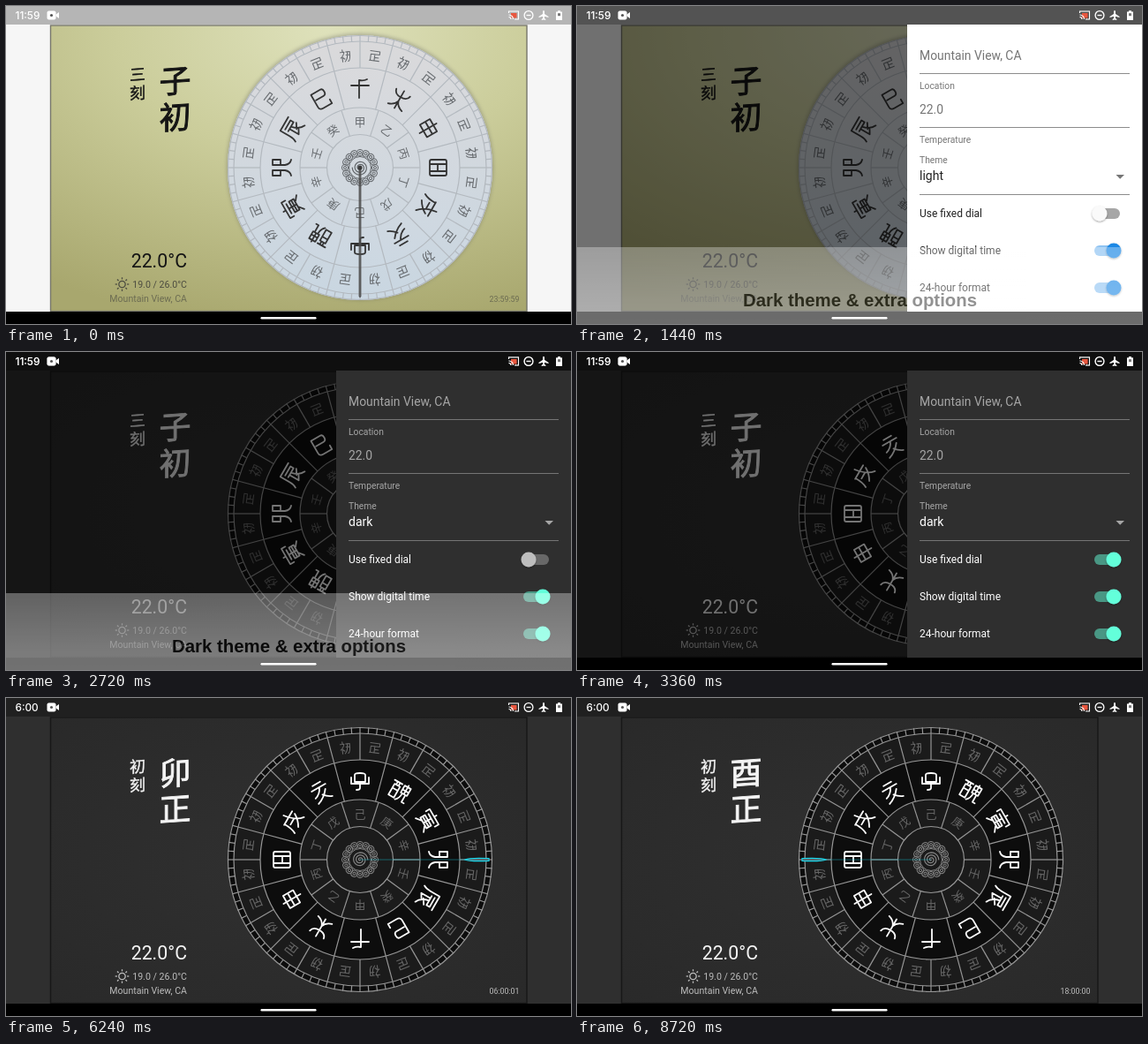
An HTML page that plays this animation: 640x360 px, repeating every 8.8 s.

```html
<!DOCTYPE html>
<html lang="en">
<head>
<meta charset="utf-8">
<title>Twelve-hour dial clock</title>
<style>
html, body { margin: 0; width: 100%; height: 100%; overflow: hidden; background: #000; }
svg { display: block; width: 640px; height: 360px; font-family: Roboto, sans-serif; }
svg {
  --bar: #b5b5b5; --page: #f6f6f6; --edge: #77776c; --ink: #151515; --soft: #4c4c40; --place: #6c6c52;
  --line: #b3b9bf; --glyph: #333; --faint: #686c70; --core: #62666a;
  --outer: #d0d7dc; --band: #d4dae0; --inner: #d3d9de; --sheet: #fff; --label: #757575;
  --strong: #222; --rule: #8c8c8c; --on: #1e88e5; --thumb: #fafafa; --track: #a6a6a6;
}
svg.dark {
  --bar: #202020; --page: #2f2f2f; --edge: #171717; --ink: #f4f4f4; --soft: #bdbdbd; --place: #bdbdbd;
  --line: #969696; --glyph: #fff; --faint: #666; --core: #858585;
  --outer: #1b1b1b; --band: #0d0d0d; --inner: #1b1b1b; --sheet: #2f2f2f; --label: #a6a6a6;
  --strong: #fff; --rule: #757575; --on: #64ffda; --thumb: #bdbdbd; --track: #686868;
}
.light-only, .dark-only { visibility: hidden; }
svg:not(.dark) .light-only, svg.dark .dark-only { visibility: visible; }
.han { font-family: "Noto Sans CJK SC", "Noto Sans CJK", "Noto Sans CJK JP", sans-serif; text-anchor: middle; }
.big, .small { fill: var(--ink); stroke: var(--ink); }
.big { font-size: 36px; font-weight: 500; stroke-width: .9px; }
.small { font-size: 18px; stroke-width: .4px; }
.end { text-anchor: end; }
.seal, .mark { fill: none; stroke-linejoin: round; stroke-linecap: round; }
.seal { stroke: var(--glyph); stroke-width: 1.8; }
.mark { stroke: var(--faint); stroke-width: 1.2; }
.stem { font-size: 13px; font-weight: 300; fill: var(--faint); }
.grid { fill: none; stroke: var(--line); stroke-width: 1.2; }
.bar { font: 500 11.8px Inter, sans-serif; fill: #fff; }
.label { fill: var(--label); }
.strong { fill: var(--strong); }
</style>
</head>
<body>
<script>
const LOOP = 8800, CX = 401, CY = 183;
const branches = {
  子: "M-6 1V-7Q-6-9 0-9Q6-9 6-7V1ZM-10-4V3H10V-4M0 1V8Q0 10-4 10",
  丑: "M-11-9H-1M-9-5H-2V9H-9ZM-9 0H-2M-7-9V-5M-4-9V-5M2-9H10V0H2ZM6-11V0M2-4H10M4 0Q4 7 0 10M8 0V9H11",
  寅: "M0-11V-8M-10-3V-8H10V-3M-6-4H6M-7 0H7V6H-7ZM0-4V6M-7 3H7M-4 7L-9 11M4 7L9 11",
  卯: "M-3-10V4Q-4 10-9 11M-3-10H-9V-1H-3M3-10V4Q4 10 9 11M3-10H9V-1H3",
  辰: "M-9-10H9M-9-10V2Q-9 8-11 11M-5-6H7V-2H-5M-2-2V10L3 7M8 1L2 5M1-2Q3 8 10 11",
  巳: "M-5-2H5Q8-2 8-6Q8-10 5-10H-7V6Q-7 10-2 10H9V5",
  午: "M-10-4H10M-1-10V10M-1-10Q4-9 8-11",
  未: "M0-11V11M-9-9Q-8-3 0-3Q8-3 9-9M0 2Q-2 8-9 10M0 2Q2 8 9 10",
  申: "M0-11V11M-8-7H8V6H-8ZM-8-1H8",
  酉: "M-7-9H7Q9-9 9-7V8Q9 10 7 10H-7Q-9 10-9 8V-7Q-9-9-7-9M-4-9V10M4-9V10M-4 1H4",
  戌: "M-9-5H9M-8-5Q-8 5-11 10M0-11Q2 4 10 10M8-1Q4 6-3 10M-5 1H2",
  亥: "M-5-10H5M-9-5H9M1-5Q-2 2-9 4M6 0Q0 8-9 11M0 4Q4 9 9 11"
};
const halves = [
  "M-6-6H6V-2H-5M0-2V6M0 2H5M-5-2V6M-6 6H6",
  "M-3-8V-5M-6-5H-1Q-3 1-6 2M-4 0V7M-3 2L-1 4M1-5H6Q6 6 3 7M3-5Q3 4-1 7M1-1H6"
];
const stems = [..."己庚辛壬癸甲乙丙丁戊"];

// start, fade length, cut?, characters, digital time, status time, hand angle
const scenes = [
  [0, 1, true, "子初三", "23:59:59", "11:59", 0],
  [4080, 620, false, "子正初", "00:00:00", "12:00", 0],
  [4720, 320, true, "卯初三", "05:59:59", "5:59", 90],
  [5360, 640, false, "卯正初", "06:00:00", "6:00", 90],
  [6160, 1, true, "卯正初", "06:00:01", "6:00", 90],
  [6320, 1, true, "午初三", "11:59:59", "11:59", 180],
  [6560, 640, false, "午正初", "12:00:00", "12:00", 180],
  [7440, 320, true, "酉初三", "17:59:59", "5:59", 270],
  [7840, 640, false, "酉正初", "18:00:00", "6:00", 270]
];

const times = (n, f) => Array.from({ length: n }, (_, i) => f(i)).join("");
const polar = (deg, r, body) => `<g transform="rotate(${deg}) translate(0 ${-r})">${body}</g>`;
const circle = (r, fill) => `<circle r="${r}" style="fill:${fill}"/>`;
const text = (x, y, size, cls, str) => `<text x="${x}" y="${y}" font-size="${size}" class="${cls}">${str}</text>`;
const spokes = (n, r1, r2, shift = 0) =>
  times(n, i => `<path d="M0 ${-r1}V${-r2}" transform="rotate(${i * 360 / n + shift})"/>`);
const pair = (slot, make) => times(2, i => `<g data-slot="${slot}${i}">${make}</g>`);

const spiral = "M0 0" + times(60, i => {
  const a = i * 0.32, r = i * 0.15;
  return `L${(r * Math.cos(a)).toFixed(1)} ${(r * Math.sin(a)).toFixed(1)}`;
});

const dial = `
  <circle r="151" cy="1" class="light-only" fill="#555" opacity=".35" filter="url(#blur)"/>
  ${circle(150, "var(--band)")}${circle(143, "var(--outer)")}
  ${circle(113, "var(--band)")}${circle(68, "var(--inner)")}
  <circle r="150" class="light-only" fill="url(#sheen)"/>
  <g class="grid">
    ${[149.5, 143, 113, 68, 37.5].map(r => `<circle r="${r}"/>`).join("")}
    ${spokes(96, 143, 150)}${spokes(24, 113, 143)}${spokes(12, 68, 113, 15)}${spokes(10, 37.5, 68, 18)}
  </g>
  ${Object.values(branches).map((d, i) => polar(i * 30, 89, `<path class="seal" d="${d}"/>`)).join("")}
  ${times(24, i => polar(i * 15 + 7.5, 127.5, `<path class="mark" d="${halves[i % 2]}" transform="scale(.9)"/>`))}
  ${stems.map((s, i) => polar(i * 36, 52, `<text class="han stem" y="5">${s}</text>`)).join("")}
  <g style="fill:none;stroke:var(--core)">
    ${times(16, i => polar(i * 22.5, 17, '<circle r="3.6"/><circle r="1.5"/>'))}
    <circle r="12.5"/><path d="${spiral}" stroke-width="1.2"/>
  </g>`;

const hand = `
  <g class="light-only"><path d="M0 0V-146" stroke="#555" stroke-width="4" opacity=".4"/>
    <path d="M0 0V-147" stroke="#4a4a4a" stroke-width="1.5"/><circle r="2.5" fill="#3a3a3a"/></g>
  <g class="dark-only"><path d="M0 0V-120" stroke="#16a9b8" opacity=".5"/>
    <path d="M0-119Q2.4-124 1.4-146H-1.4Q-2.4-124 0-119Z" fill="#59666a" stroke="#18d4e8" stroke-width="1.2"/></g>`;

const icons = `<g fill="#fff">
  <rect x="46.5" y="5.5" width="10" height="10" rx="2"/><path d="M56.5 9.5L60 7V14L56.5 11.5Z"/>
  <circle cx="51.5" cy="10.5" r="1.6" fill="#555"/>
  <rect x="572" y="8" width="6.5" height="5.5" fill="#e8573f"/>
  <path d="M569.5 8V6H580.5V15H576M569.5 10A5 5 0 0 1 574.5 15M569.5 12.5A2.5 2.5 0 0 1 572 15"
    fill="none" stroke="#fff" stroke-width="1.1"/>
  <g fill="none" stroke="#fff" stroke-width="1.3"><circle cx="592" cy="10.5" r="4.9"/><path d="M589.5 10.5H594.5"/></g>
  <path d="M609 5Q610 5 610 6.5V9L614.5 12V13L610 11.7V14L611.3 15V16L609 15.4L606.7 16V15L608 14V11.7L603.5 13V12L608 9V6.5Q608 5 609 5Z"/>
  <path d="M623 6.5H625V5.3H628V6.5H630V16H623Z"/>
  <rect x="625" y="8.2" width="3" height="3" fill="#777"/>
</g>`;
const statusBar = slot => pair(slot, '<text class="bar" x="10.5" y="14.8"></text>') + icons;

const toggle = (id, y) => `<g transform="translate(600 ${y})">
  <rect x="-14" y="-6" width="29" height="12" rx="6" id="${id}Track"/>
  <circle r="8.5" id="${id}Thumb" filter="url(#drop)"/></g>`;
const rule = y => `<path d="M388 ${y}.5H626" style="stroke:var(--rule)"/>`;

const drawer = `
  <rect x="374" y="21" width="266" height="325" style="fill:var(--sheet)"/>
  ${text(388, 61, 13.9, "label", "Mountain View, CA")}${rule(76)}
  ${text(388, 94, 10.3, "label", "Location")}
  ${text(388, 122, 13.9, "label", "22.0")}${rule(137)}
  ${text(388, 155, 10.3, "label", "Temperature")}
  ${text(388, 178, 10.3, "label", "Theme")}
  ${text(388, 197, 14, "strong", '<tspan id="theme"></tspan>')}
  <path d="M610.5 191H620L615.2 195.8Z" style="fill:var(--label)"/>${rule(213)}
  ${text(388, 239, 12, "strong", "Use fixed dial")}${toggle("fixed", 235)}
  ${text(388, 281, 12, "strong", "Show digital time")}${toggle("digital", 277)}
  ${text(388, 323, 12, "strong", "24-hour format")}${toggle("format", 319)}`;

const kai = (x, y, cls, str = "") =>
  `<text class="han ${cls}" transform="translate(${x} ${y}) skewY(-4)">${str}</text>`;
const panel = more => `<rect x="50.5" y="22" width="539.5" height="323.5" ${more}/>`;

document.body.innerHTML = `<svg viewBox="0 0 640 360">
  <defs>
    <radialGradient id="olive" cx=".58" cy=".02" r="1.05">
      <stop offset="0" stop-color="#dee1bb"/><stop offset=".42" stop-color="#cbcd9b"/>
      <stop offset="1" stop-color="#a8a76e"/></radialGradient>
    <radialGradient id="coal" r=".75"><stop offset="0" stop-color="#303030"/>
      <stop offset="1" stop-color="#292929"/></radialGradient>
    <linearGradient id="sheen" x1="0" y1="0" x2="0" y2="1">
      <stop offset="0" stop-color="#c5d6e4" stop-opacity=".65"/>
      <stop offset="1" stop-color="#dedada" stop-opacity=".75"/></linearGradient>
    <linearGradient id="veil" x1="0" y1="0" x2="0" y2="1">
      <stop offset="0" stop-color="#fff" stop-opacity=".74"/>
      <stop offset=".75" stop-color="#fff" stop-opacity=".98"/>
      <stop offset="1" stop-color="#fff"/></linearGradient>
    <filter id="blur"><feGaussianBlur stdDeviation="2"/></filter>
    <filter id="drop" x="-30%" y="-30%" width="160%" height="170%">
      <feDropShadow dx="0" dy="1" stdDeviation=".8" flood-opacity=".4"/></filter>
  </defs>
  <rect width="640" height="346" style="fill:var(--page)"/>
  <rect width="640" height="21" style="fill:var(--bar)"/>
  ${panel('fill="url(#olive)" class="light-only"')}
  ${panel('fill="url(#coal)" class="dark-only"')}
  ${panel('style="fill:none;stroke:var(--edge)" stroke-width="1.4"')}
  ${pair("first", kai(191.5, 98, "big"))}
  ${pair("second", kai(191.5, 139, "big"))}
  ${pair("quarter", kai(149, 84, "small"))}
  ${kai(149, 105, "small", "刻")}
  <g style="fill:var(--ink)">${text(205, 296, 21.3, "end", "22.0°C")}</g>
  <g style="fill:var(--soft)">${text(205, 319, 10.6, "end", "19.0 / 26.0°C")}</g>
  <g style="fill:var(--place)">
    ${text(205, 335, 10.55, "end", "Mountain View, CA")}
    ${pair("digital", text(581.5, 335, 8.8, "end", ""))}
  </g>
  <g transform="translate(131.5 315)" style="fill:none;stroke:var(--soft)" stroke-width="1.3">
    <circle r="3.7"/>${spokes(8, 5.6, 7.8)}</g>
  <g transform="translate(${CX} ${CY})">
    <g id="dial">${dial}</g>
    ${pair("hand", hand)}
  </g>
  ${statusBar("status")}
  <rect id="scrim" width="640" height="346"/>
  <g id="lit">${statusBar("lit")}</g>
  <g id="drawer">${drawer}</g>
  <rect y="346" width="640" height="14"/>
  <rect x="288.5" y="352" width="63" height="2.4" rx="1.2" fill="#fff"/>
  <g id="caption">
    <rect y="273" width="640" height="87" fill="url(#veil)"/>
    <text x="320.5" y="339.5" font-size="20.4" font-weight="700" text-anchor="middle"
      font-family="Liberation Sans, Arial, sans-serif">Dark theme &amp; extra options</text>
  </g>
</svg>`;

const svg = document.querySelector("svg");
const $ = id => document.getElementById(id);
const slots = {};
document.querySelectorAll("[data-slot]").forEach(g => slots[g.dataset.slot] = g);
const clamp = x => Math.min(1, Math.max(0, x));
const ramp = (t, a, b) => clamp((t - a) / (b - a));
const easeOut = x => 1 - (1 - x) ** 3;

function blend(name, old, now, p, put) {
  const same = old === now;
  put(slots[name + 0], old);
  put(slots[name + 1], now);
  slots[name + 0].style.opacity = same ? 0 : 1 - p;
  slots[name + 1].style.opacity = same ? 1 : p;
}
const setText = (g, s) => { g.firstElementChild.textContent = s; };
const setAngle = (g, a) => g.setAttribute("transform", `rotate(${a})`);

function setToggle(id, p) {
  const on = p > 0.5;
  $(id + "Thumb").setAttribute("cx", -8 + 16 * p);
  $(id + "Thumb").style.fill = on ? "var(--on)" : "var(--thumb)";
  $(id + "Track").style.fill = on ? "var(--on)" : "var(--track)";
  $(id + "Track").style.opacity = on ? 0.5 : 1;
}

function draw(t) {
  const dark = t >= 2160, fixed = t >= 2880, closed = t >= 3760;
  svg.classList.toggle("dark", dark);

  const i = scenes.findLastIndex(s => t >= s[0]);
  const now = scenes[i], old = scenes[Math.max(0, i - 1)];
  const p = ramp(t, now[0], now[0] + now[1]), cut = now[2] ? p : 1;
  ["first", "second", "quarter"].forEach((n, k) => blend(n, old[3][k], now[3][k], p, setText));
  blend("digital", old[4], now[4], cut, setText);
  blend("status", old[5], now[5], cut, setText);
  blend("lit", old[5], now[5], cut, setText);
  blend("hand", fixed ? old[6] : 180, fixed ? now[6] : 180, cut, setAngle);
  setAngle($("dial"), fixed ? 0 : 180);

  const open = closed ? 0 : easeOut(ramp(t, 1130, 1400));
  $("scrim").style.opacity = 0.54 * open;
  $("lit").style.opacity = open;
  $("drawer").setAttribute("transform", `translate(${266 * (1 - open)} 0)`);
  $("theme").textContent = dark ? "dark" : "light";
  setToggle("fixed", ramp(t, 2860, 3120));
  setToggle("digital", 1);
  setToggle("format", 1);
  $("caption").style.opacity = ramp(t, 1220, 1740) * (1 - ramp(t, 2420, 2960));
}

function tick() {
  draw(performance.now() % LOOP);
  requestAnimationFrame(tick);
}
tick();
</script>
</body>
</html>
```
